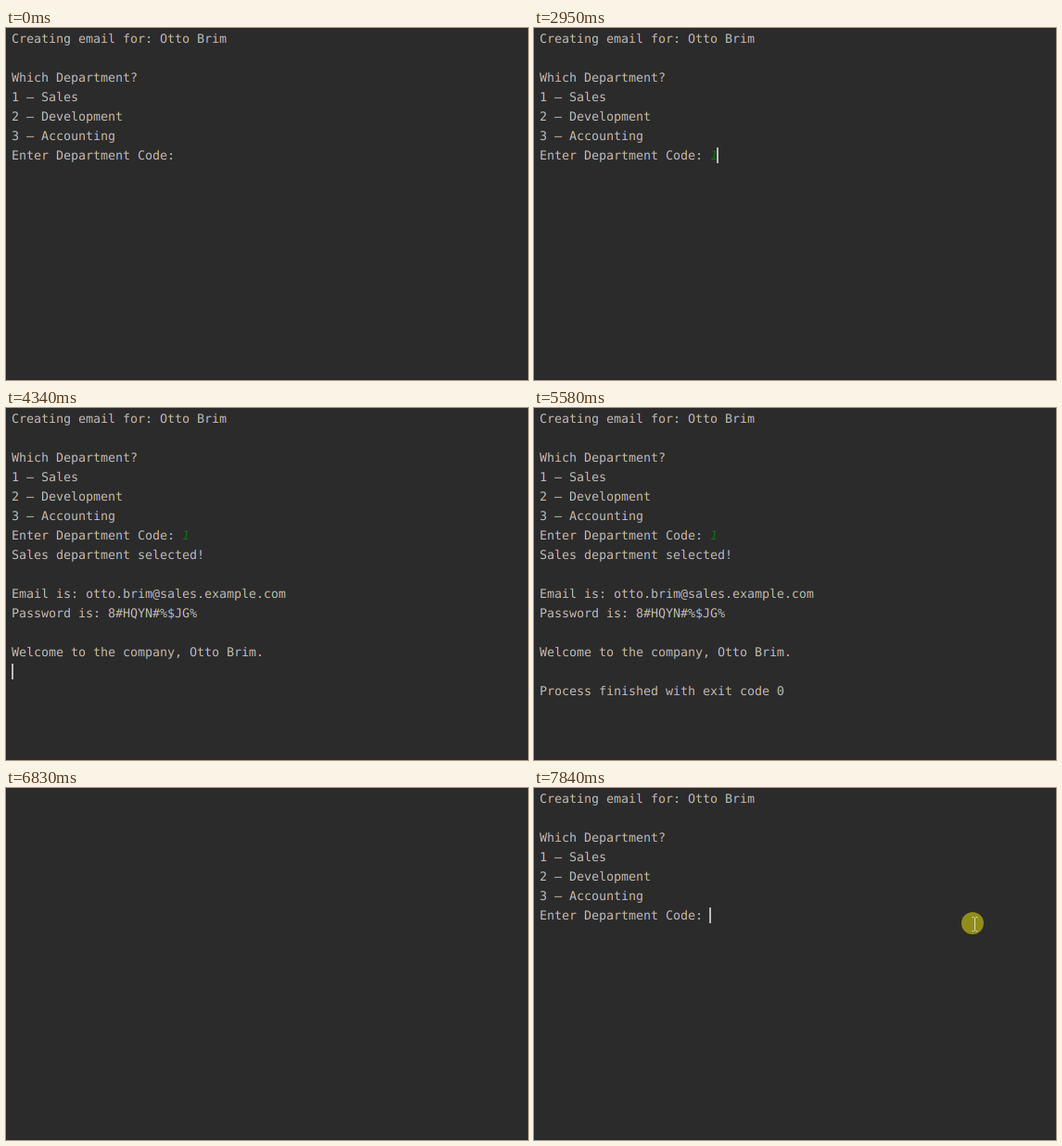
An HTML page that plays this animation: 563x380 px, repeating every 8000 ms.

```html
<!DOCTYPE html>
<html lang="en">
<head>
<meta charset="utf-8">
<title>Console session</title>
<style>
  html, body { margin: 0; width: 100%; height: 100%; overflow: hidden; background: #2b2b2b; }
  svg { display: block; width: 563px; height: 380px; }
  text { font: 13.29px "DejaVu Sans Mono", "Noto Sans Mono", monospace; white-space: pre; text-rendering: geometricPrecision; }
  #layers g { mix-blend-mode: lighten; }
  #input { font-style: italic; }
</style>
</head>
<body>
<svg viewBox="0 0 563 380">
  <rect width="563" height="380" fill="#2b2b2b"/>
  <g id="layers"></g>
  <text id="input" fill="#087808">1</text>
  <rect id="caret" width="2" height="17" fill="#bbb"/>
  <circle id="click" r="12" fill="#908e17"/>
  <path id="pointer" d="M-3 -7.5H-1M1 -7.5H3M-3 7.5H-1M1 7.5H3M0 -7V7" fill="none" stroke="#d8d8d0"/>
</svg>
<script>
const LOOP = 8000, LEFT = 6, COLUMN = 8, LINE = 21, BASELINE = 16, BLINK = 500;
const $ = id => document.getElementById(id);

const prompt = [
  "Creating email for: Otto Brim", "",
  "Which Department?",
  "1 – Sales",
  "2 – Development",
  "3 – Accounting",
  "Enter Department Code: "
];
const typed = [...prompt.slice(0, -1), prompt.at(-1) + " "];  // the blank holds the green digit
const answered = [
  ...typed,
  "Sales department selected!", "",
  "Email is: otto.brim@sales.example.com",
  "Password is: 8#HQYN#%$JG%", "",
  "Welcome to the company, Otto Brim.", ""
];
const finished = [...answered, "Process finished with exit code 0", ""];

// hold: how long the caret stays lit before it starts to blink
const scenes = [
  { start: 0, lines: prompt },
  { start: 1640, lines: prompt, hold: BLINK },
  { start: 2720, lines: typed, hold: 860 },
  { start: 4110, lines: [...typed, ""], hold: 860 },
  { start: 4340, lines: answered, hold: 860 },
  { start: 4720, lines: finished, hold: 860 },
  { start: 6830, lines: [] },
  { start: 7140, lines: prompt },
  { start: 7840, lines: prompt, hold: BLINK }
];

function add(parent, tag, attributes) {
  const el = document.createElementNS("http://www.w3.org/2000/svg", tag);
  for (const name in attributes) el.setAttribute(name, attributes[name]);
  return parent.appendChild(el);
}

// Colour channels sit a third of a pixel apart, like LCD text smoothing.
const layers = ["#2b2bb6", "#2bbd2b", "#c42b2b"].map((fill, i) => {
  const layer = add($("layers"), "g", { fill, transform: `translate(${(i - 1) / 3})` });
  if (i !== 1) layer.setAttribute("aria-hidden", "true");
  return finished.map((_, row) => add(layer, "text", { x: LEFT, y: BASELINE + row * LINE }));
});

const inputColumn = prompt.at(-1).length;
$("input").setAttribute("x", LEFT + inputColumn * COLUMN);
$("input").setAttribute("y", BASELINE + (prompt.length - 1) * LINE);

const show = (el, on) => el.setAttribute("visibility", on ? "visible" : "hidden");

function place(el, point) {
  show(el, point);
  if (point) el.setAttribute("transform", `translate(${point})`);
}

function glide(t, start, end, from, to) {
  const p = Math.min(1, Math.max(0, (t - start) / (end - start)));
  const eased = 1 - (1 - p) ** 2;
  const [x, y] = from.map((v, i) => v + (to[i] - v) * eased);
  return [Math.floor(x) + .5, Math.round(y)];
}

function pointerAt(t) {
  const rest = [474.5, 173], target = [474.5, 162];
  if (t < 470) return null;
  if (t < 1320) return glide(t, 470, 710, [480.5, 277], rest);
  if (t < 2870) return glide(t, 1320, 1410, rest, target);
  if (t < 2950) return [480.5, 161];
  if (t < 7140) return null;
  return glide(t, 7140, 7440, [556.5, 122], [475.5, 147]);
}

function caretAt(t, { start, lines, hold }) {
  const idle = t - start - hold;
  const lit = idle < 0 || Math.floor(idle / BLINK) % 2 === 1;
  if (!hold || !lit) return null;
  const x = LEFT - 1 + lines.at(-1).length * COLUMN;
  return [Math.max(LEFT, x), 3 + (lines.length - 1) * LINE];
}

let shown;
function draw(t) {
  const scene = scenes.findLast(s => s.start <= t);
  if (scene.lines !== shown) {
    shown = scene.lines;
    for (const rows of layers)
      rows.forEach((row, i) => row.textContent = shown[i] ?? "");
    show($("input"), shown.length && shown !== prompt);
  }

  const pointer = pointerAt(t);
  const pressed = (t >= 1640 && t < 1720) || t >= 7840;
  place($("pointer"), pointer);
  place($("click"), pressed && [pointer[0] - 2.5, pointer[1] - 1]);
  place($("caret"), caretAt(t, scene));
}

const start = performance.now();
function tick() {
  draw((performance.now() - start) % LOOP);
  requestAnimationFrame(tick);
}
tick();
</script>
</body>
</html>
```
